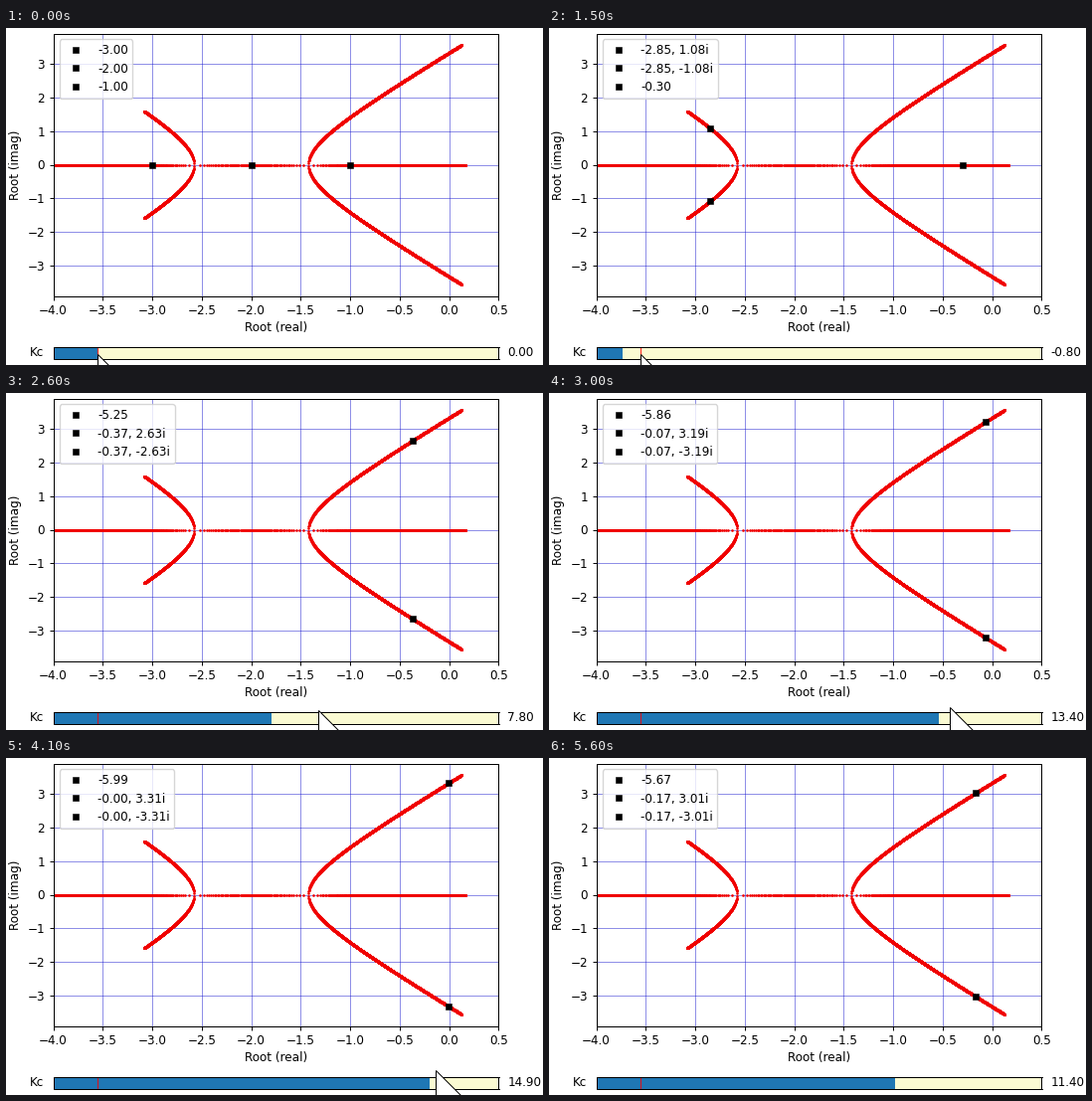
These frames come from a looping animation (540 by 339 pixels, 6200 ms). A matplotlib script:

```python
import numpy as np
import matplotlib.pyplot as plt
from matplotlib.animation import FuncAnimation
from matplotlib.patches import Polygon, Rectangle
from matplotlib.transforms import IdentityTransform

W, H, DPI = 540, 339, 100
FRAMES, INTERVAL = 62, 100
K_MIN, K_MAX = -2, 18
LEFT, RIGHT = 47.5, 495.5
RED = "#f00000"

plt.rcParams.update({
    "font.family": "DejaVu Sans", "font.size": 8.64,
    "axes.linewidth": 0.72,
    "xtick.major.size": 3.1, "ytick.major.size": 3.1,
    "xtick.major.width": 0.7, "ytick.major.width": 0.7,
    "xtick.major.pad": 3.1, "ytick.major.pad": 3.1,
})

# drag of the slider: (frame, gain, ease-out power on the way there)
DRAG = [(0, 0, 1), (8, -1.4, 1), (12, -2.3, 1), (15, -0.8, 1), (26, 7.8, 1),
        (34, 14.2, 3), (41, 14.9, 1), (46, 15.6, 2), (55, 11.4, 1)]


def hand(i):
    for (i0, k0, _), (i1, k1, power) in zip(DRAG, DRAG[1:]):
        if i <= i1:
            t = (i - i0) / (i1 - i0)
            return k0 + (k1 - k0) * (1 - (1 - t) ** power)
    return DRAG[-1][1]


def tip(i):
    """Pointer tip; it runs one frame ahead of the slider, then drops out."""
    k = hand(i + 1) if i else 0
    x = LEFT + (k - K_MIN) / (K_MAX - K_MIN) * (RIGHT - LEFT)
    y = 328 - 0.9 * k + 5 * max(0, i - 51)
    return x, H - y


def roots(k):
    """Closed-loop poles of 4 / ((s+1)(s+2)(s+3)) with gain k."""
    r = np.roots([1, 6, 11, 6 + 4 * k])
    return sorted(r, key=lambda s: (round(s.real, 6), -s.imag))


def name(s):
    if abs(s.imag) < 1e-6:
        return f"{s.real:.2f}"
    return f"{s.real:.2f}, {s.imag:.2f}i"


def px_axes(top, bottom):
    return fig.add_axes([LEFT / W, 1 - bottom / H,
                         (RIGHT - LEFT) / W, (bottom - top) / H])


fig = plt.figure(figsize=(W / DPI, H / DPI), dpi=DPI, facecolor="white")

# root locus plot
ax = px_axes(5.5, 269.5)
locus = np.array([roots(k) for k in np.linspace(K_MIN, K_MAX, 8001)]).ravel()
ax.plot(locus.real, locus.imag, "o", color=RED, ms=1.9, mew=0, zorder=2)
ax.set(xlim=(-4, 0.5), ylim=(-3.883, 3.883), yticks=range(-3, 4))
ax.grid(color="#2020d0", lw=0.55, alpha=0.65)
fig.text(272 / W, 1 - 301 / H, "Root (real)", ha="center", va="center")
fig.text(10 / W, 1 - 138 / H, "Root (imag)", rotation=90,
         ha="center", va="center")
poles = [ax.plot([], [], "s", color="black", ms=4.6, mew=0.4, zorder=4)[0]
         for _ in range(3)]

# gain slider
sl = px_axes(320.5, 332.5)
sl.set(xlim=(K_MIN, K_MAX), ylim=(0, 1), xticks=[], yticks=[],
       facecolor="lightgoldenrodyellow")
bar = sl.add_patch(Rectangle((K_MIN, 0), 0, 1, color="#1f77b4", lw=0))
sl.axvline(0, color="red", lw=0.85, alpha=0.8)
sl.text(-0.02, 0.5, "Kc", transform=sl.transAxes, ha="right", va="center")
value = sl.text(1.02, 0.5, "", transform=sl.transAxes, va="center")

# mouse pointer, cut off by the lower edge
ARROW = np.array([(0, 0), (0, -45), (45, -45)])
pointer = Polygon(ARROW, closed=True, fc="white", ec="black", lw=0.72,
                  transform=IdentityTransform(), zorder=10)
fig.add_artist(pointer)


def draw(i):
    k = round(max(K_MIN, hand(i)), 1)
    for line, s in zip(poles, roots(k)):
        line.set_data([s.real], [s.imag])
        line.set_label(name(s))
    ax.legend(handles=poles, loc="upper left", numpoints=1, labelspacing=0.45)
    bar.set_width(k - K_MIN)
    value.set_text(f"{k:.2f}")
    pointer.set_xy(ARROW + tip(i))
    return [*poles, bar, value, pointer]


anim = FuncAnimation(fig, draw, frames=FRAMES, interval=INTERVAL,
                     repeat=True, repeat_delay=0, blit=False)
plt.show()
```
